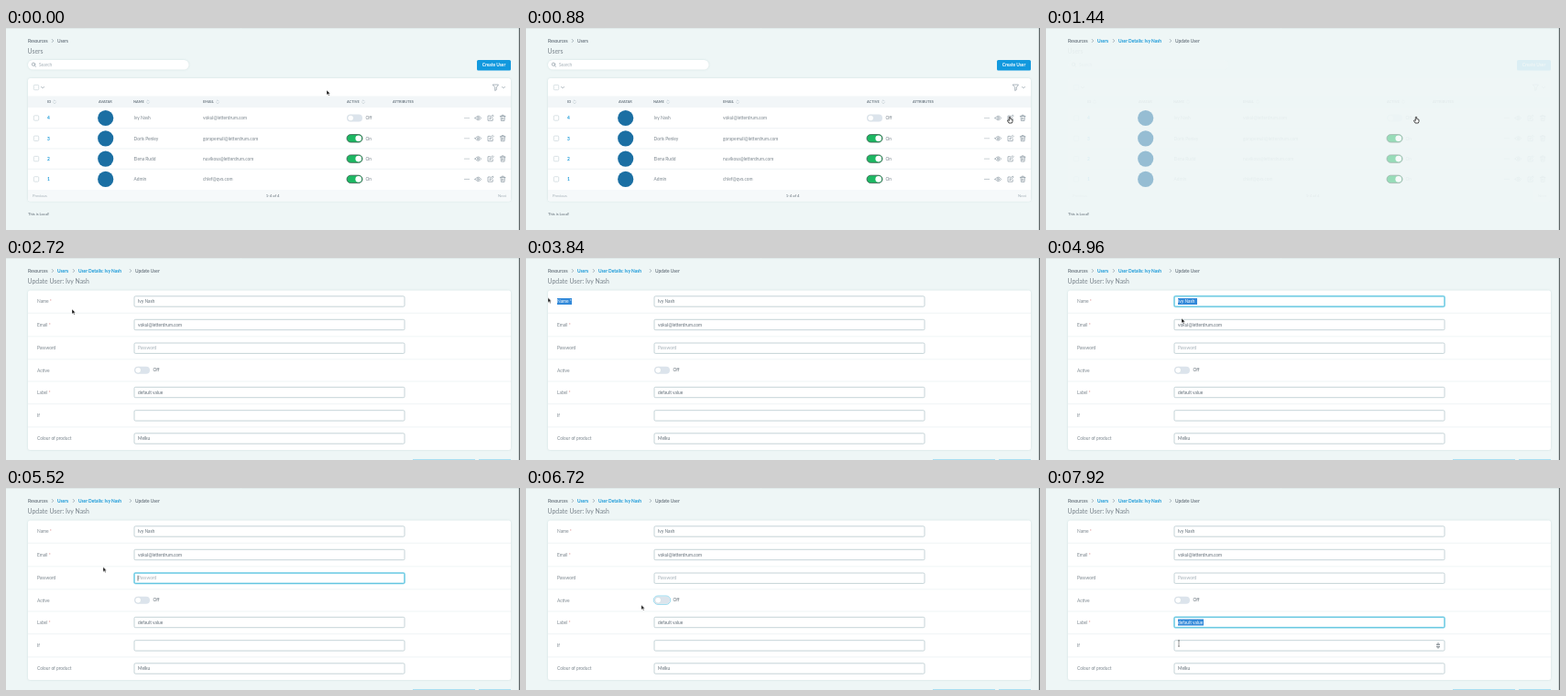
An HTML page that plays this animation: 561x221 px, repeating every 8000 ms.

```html
<!DOCTYPE html>
<html lang="en">
<head>
<meta charset="utf-8">
<title>User admin</title>
<style>
  html, body { margin: 0; width: 100%; height: 100%; overflow: hidden; background: #eef6f6; }
  svg { display: block; width: 561px; height: 221px; }
  text { font: 4.85px Lato, "Open Sans", sans-serif; fill: #5f6b75; white-space: pre; }
  .title { font-size: 6.9px; fill: #7a848c; }
  .crumb { fill: #4a5662; }
  .link { fill: #1497d8; font-weight: 700; }
  .head { font-size: 3.9px; font-weight: 700; fill: #6d7983; }
  .label { fill: #7a858d; }
  .pale { fill: #a3afb7; }
  .tiny { font-size: 4.2px; }
  .white { fill: #fff; }
  .line { fill: none; stroke: #8c9aa4; stroke-width: .7; stroke-linecap: round; stroke-linejoin: round; }
  .box { fill: #fff; stroke: #c9d5da; stroke-width: .7; }
  .input { fill: #fff; stroke: #b6c8cd; stroke-width: .8; }
  .rule { stroke: #e9eff1; stroke-width: .7; }
  .select { fill: #3289d9; }
  .card { fill: #fff; filter: drop-shadow(0 .7px 1px #0a465020); }
  .note { font: 700 18px "Open Sans", "Noto Sans", sans-serif; fill: #111; }

  /* One percent of the loop is one 80 ms tick. */
  .list, .rich, .form, #cursor { animation: 8s step-end infinite; }
  .list { animation-name: list; }
  .rich { animation-name: rich; }
  .form { animation-name: form; }
  #cursor { animation-name: move; }

  @keyframes list {
    0% { opacity: 1 }
    13% { opacity: 1; animation-timing-function: steps(5) }
    18% { opacity: .08 }
    19%, 100% { opacity: 0 }
  }
  @keyframes rich {
    0% { opacity: 1 }
    14% { opacity: 1; animation-timing-function: steps(4) }
    18% { opacity: .42; animation-timing-function: steps(2) }
    20%, 100% { opacity: 0 }
  }
  @keyframes form {
    0% { opacity: 0 }
    18% { opacity: 0; animation-timing-function: steps(4) }
    22%, 100% { opacity: 1 }
  }
  @keyframes move {
    0% { transform: translate(350px, 68px); animation-timing-function: steps(11) }
    11% { transform: translate(528px, 97px); animation-timing-function: steps(7) }
    18% { transform: translate(404px, 97px); animation-timing-function: steps(4) }
    22% { transform: translate(328px, 91px); animation-timing-function: steps(11) }
    33% { transform: translate(73px, 56px) }
    34% { transform: translate(72px, 56px) }
    36% { transform: translate(72px, 56px); animation-timing-function: steps(4) }
    40% { transform: translate(51px, 48px) }
    41% { transform: translate(51px, 48px); animation-timing-function: steps(3) }
    44% { transform: translate(27px, 47px) }
    46% { transform: translate(27px, 47px); animation-timing-function: steps(2) }
    48% { transform: translate(24px, 43.5px) }
    51% { transform: translate(24px, 43.5px); animation-timing-function: steps(8) }
    59% { transform: translate(169px, 58.5px); animation-timing-function: steps(3) }
    62% { transform: translate(148px, 66px); animation-timing-function: steps(7) }
    69% { transform: translate(106px, 86.5px); animation-timing-function: steps(3) }
    72% { transform: translate(108px, 95px) }
    76% { transform: translate(108px, 95px); animation-timing-function: steps(9) }
    85% { transform: translate(128px, 132px) }
    86% { transform: translate(128px, 132px); animation-timing-function: steps(5) }
    91% { transform: translate(158px, 147px) }
    92% { transform: translate(158px, 147px); animation-timing-function: steps(3) }
    95% { transform: translate(157px, 169px) }
    97% { transform: translate(156px, 169px) }
    99%, 100% { transform: translate(145px, 170px) }
  }
</style>
</head>
<body>
<svg viewBox="0 0 561 221">
  <defs>
    <linearGradient id="panel" x2="0" y2="1">
      <stop stop-color="#eee"/><stop offset="1" stop-color="#cfcfcf"/>
    </linearGradient>
    <path id="next" class="line" d="M-.8-1.6.8 0-.8 1.6"/>
    <path id="down" class="line" d="M-1.5-.7 0 .8 1.5-.7"/>
    <path id="sort" class="line" style="stroke:#bcc8cf" d="M-1.2-.8 0-2 1.2-.8M-1.2.8 0 2 1.2.8"/>
    <rect id="check" class="box" x="-2.7" y="-2.7" width="5.4" height="5.4" rx="1"/>
    <g id="off">
      <rect y="-4" width="17" height="8" rx="4" fill="#dce4ec"/>
      <circle cx="4.2" r="3.3" fill="#fff" stroke="#c4d0d8" stroke-width=".5"/>
    </g>
    <g id="on">
      <rect y="-4.2" width="17" height="8.4" rx="4.2" fill="#1db863" stroke="#35584a" stroke-width=".8"/>
      <circle cx="12.7" r="3.3" fill="#fff"/>
    </g>
    <g id="tools" class="line">
      <path d="M501 0h.01M503 0h.01M505 0h.01" stroke-width="1.1"/>
      <path d="M512 0Q515.3-4.6 518.6 0 515.3 4.6 512 0Z"/><circle cx="515.3" r="1"/>
      <path d="M528.5-2.4H526V2.8H531.2V.6M528 .8 528.4-.8 531.2-3.4 532.2-2.4 529.4.4Z"/>
      <path d="M539.3-2H545M541-2V-3.2H543.2V-2M540-2 540.4 3H544L544.4-2M541.4-.4V1.6M542.9-.4V1.6"/>
    </g>
  </defs>

  <rect width="561" height="221" fill="#eef6f6"/>

  <text class="crumb" x="24" y="15.6">Resources</text>
  <use href="#next" x="51" y="14"/>
  <g data-show="0 16"><text class="crumb" x="56" y="15.6">Users</text></g>
  <g data-show="16 100">
    <text class="link" x="56" y="15.6">Users</text>
    <use href="#next" x="74" y="14"/>
    <text class="link" x="79" y="15.6">User Details: Ivy Nash</text>
    <use href="#next" x="136" y="14"/>
    <text class="crumb" x="141" y="15.6">Update User</text>
  </g>
  <text class="tiny" x="24" y="205" data-show="0 20">This is Local!</text>

  <g class="list">
    <text class="title" x="23.5" y="28.3">Users</text>
    <rect x="24" y="35" width="175.5" height="10.5" rx="5.2" class="card"/>
    <g class="line"><circle cx="30" cy="39.7" r="1.7"/><path d="M31.3 41 32.6 42.3"/></g>
    <text class="pale" x="36" y="42">Search</text>
    <rect x="514" y="35" width="37" height="11.5" rx="1.5" fill="#1299de"/>
    <text class="white" x="532.5" y="42.4" text-anchor="middle" font-weight="700" style="font-weight:700">Create User</text>
    <rect x="24" y="55" width="527" height="134.5" rx="2.5" class="card"/>
    <use href="#check" x="33" y="65"/><use href="#down" x="40" y="65"/>
    <path class="line" d="M531.5 62H537.5L535.3 65V67.6L533.7 68.5V65Z"/>
    <use href="#down" x="543" y="65"/>
    <rect x="24" y="74.5" width="527" height="12.5" fill="#f2f6f8"/>
    <g id="heads"></g>
    <g id="rows"></g>
    <path d="M24 177H551V187A2.5 2.5 0 0 1 548.500 189.500H26.500A2.500 2.500 0 0 1 24 187Z" fill="#f6f9fa"/>
    <text class="pale tiny" x="29" y="184.800">Previous</text>
    <text class="tiny" x="291" y="184.800" text-anchor="middle">1-4 of 4</text>
    <text class="pale tiny" x="546" y="184.800" text-anchor="end">Next</text>
  </g>
  <g class="rich" id="rich"></g>

  <g class="form">
    <text class="title" x="23.500" y="28.300">Update User: Ivy Nash</text>
    <rect x="24" y="35.500" width="527" height="174.500" rx="2.500" class="card"/>
    <g id="fields"></g>
    <path d="M444 220.500H512M516 220.500H551" stroke="#a9def2"/>
    <g data-show="43 53">
      <rect class="select" x="34" y="44" width="16" height="7"/>
      <text class="white" x="34" y="49.200">Name *</text>
    </g>
    <g id="focus"></g>
    <rect data-show="80 87" x="139.300" y="118" width="18.400" height="9.400" rx="4.700"
      fill="none" stroke="#8fd6ec" stroke-width=".9"/>
    <path data-show="94 100" class="line" style="stroke:#59656d" d="M426.500 171.200 428 169.500 429.500 171.200ZM426.500 173.700 428 175.400 429.500 173.700Z"/>
  </g>

  <g data-show="56 62">
    <rect x="397.500" y="4" width="157" height="33.500" rx="3" fill="url(#panel)" stroke="#aaa"
      style="filter:drop-shadow(0 1px 2px #0008)"/>
    <text class="note" x="476" y="27" text-anchor="middle">Enter Pressed!</text>
    <path d="M454 9.500 350 41" stroke="#f02a12" stroke-width="2"/>
    <path d="M330 45.800 352.500 35.500 356 47Z" fill="#f02a12" stroke="#a81c0c" stroke-width=".5"/>
  </g>

  <path d="M0 .3H561" stroke="#d3dfe0" stroke-width=".6"/>
  <path d="M560.400 0V221" stroke="#5d6567" stroke-width="1.200"/>

  <g id="cursor">
    <path data-show="0 10,21 89" d="M0 0V5.200L1.300 4.100 2.200 6.100 3.100 5.700 2.200 3.800H3.800Z"
      fill="#111" stroke="#fff" stroke-width=".4"/>
    <path data-show="10 21" d="M-.7.500Q0-.500.700.500V2.500L3 3.200V5.300L2.300 7H-1L-2.600 4.300-1.800 3.700-.7 4.600Z"
      fill="#fff" stroke="#222" stroke-width=".8"/>
    <path data-show="89 100" d="M-1-3.200H1M0-3.200V3.200M-1 3.200H1" stroke="#555" stroke-width=".6"/>
  </g>
</svg>
<script>
  const put = (id, html) => document.getElementById(id).innerHTML = html;
  const text = (x, y, s, cls = "") => `<text class="${cls}" x="${x}" y="${y}">${s}</text>`;
  const use = (id, x, y) => `<use href="#${id}" x="${x}" y="${y}"/>`;

  const heads = [["ID", 45, 53], ["AVATAR", 101], ["NAME", 139, 155], ["EMAIL", 215, 231],
    ["ACTIVE", 372, 390], ["ATTRIBUTES", 422]];
  put("heads", heads.map(([s, x, sort]) =>
    text(x, 82.2, s, "head") + (sort ? use("sort", sort, 80.8) : "")).join(""));

  const mail = "vokul@letterdrum.com";
  const users = [
    ["Ivy Nash", mail],
    ["Doris Penley", "gorapemuli@letterdrum.com"],
    ["Elena Rudd", "nuvikosa@letterdrum.com"],
    ["Admin", "chief@qvo.com"]
  ];
  const rowY = i => 98.5 + i * 22.3;

  put("rows", users.map(([name, email], i) => {
    const y = rowY(i), base = y + 1.7;
    return use("check", 33, y) + text(45, base, 4 - i, "link") + text(139.5, base, name, "label") +
      text(215, base, email, "label") + text(392.5, base, i ? "On" : "Off", "label") +
      (i ? `<path class="rule" d="M24 ${y - 11.1}H551"/>` : use("off", 372, y)) + use("tools", 0, y);
  }).join(""));

  put("rich", users.map((_, i) =>
    `<circle cx="108.7" cy="${rowY(i)}" r="8.6" fill="#1b6fa3"/>` +
    (i ? use("on", 372, rowY(i)) : "")).join(""));

  // Label, centre line, value, focus span, whether focus selects the value
  const fields = [
    ["Name *", 47.5, "Ivy Nash", "54 64", 21],
    ["Email *", 73, mail, "64 67", 46],
    ["Password", 98.7, "Password", "67 78", 0],
    ["Active", 123],
    ["Label *", 147, "default value", "87 100", 28],
    ["If", 172.4, ""],
    ["Colour of product", 197.5, "Melku"]
  ];
  const frame = (y, attrs) => `<rect x="140" y="${y - 5.7}" width="295" height="11.4" rx="1.3" ${attrs}/>`;

  put("fields", fields.map(([label, y, value], i) => {
    const name = label.replace("*", '<tspan fill="#d98080">*</tspan>');
    const control = value === undefined
      ? use("off", 140, 122.7) + text(160.5, 124.3, "Off")
      : frame(y, 'class="input"') + text(144, y + 1.7, value, value === label ? "pale" : "");
    const rule = i ? `<path class="rule" d="M24 ${(y + fields[i - 1][1]) / 2}H551"/>` : "";
    return rule + text(34, y + 1.7, name, "label") + control;
  }).join(""));

  put("focus", fields.filter(f => f[3]).map(([, y, value, span, width]) =>
    `<g data-show="${span}">` +
    frame(y, 'fill="none" stroke="#bfe9f5" stroke-width="2"') +
    frame(y, 'fill="none" stroke="#4fbfdc" stroke-width=".9"') +
    (width
      ? `<rect class="select" x="144" y="${y - 3.5}" width="${width}" height="7"/>` + text(144, y + 1.7, value, "white")
      : `<path d="M144 ${y - 3}v6" stroke="#333" stroke-width=".6"/>`) +
    "</g>").join(""));

  // data-show lists the spans, in percent of the loop, when a part is visible.
  for (const el of document.querySelectorAll("[data-show]")) {
    const keys = [];
    const key = (at, on) => keys.push({ offset: at / 100, opacity: on, easing: "step-end" });
    if (!el.dataset.show.startsWith("0 ")) key(0, 0);
    for (const span of el.dataset.show.split(",")) {
      const [from, to] = span.split(" ").map(Number);
      key(from, 1);
      key(to, to === 100 ? 1 : 0);
    }
    if (keys.at(-1).offset < 1) key(100, 0);
    el.animate(keys, { duration: 8000, iterations: Infinity });
  }
</script>
</body>
</html>
```
